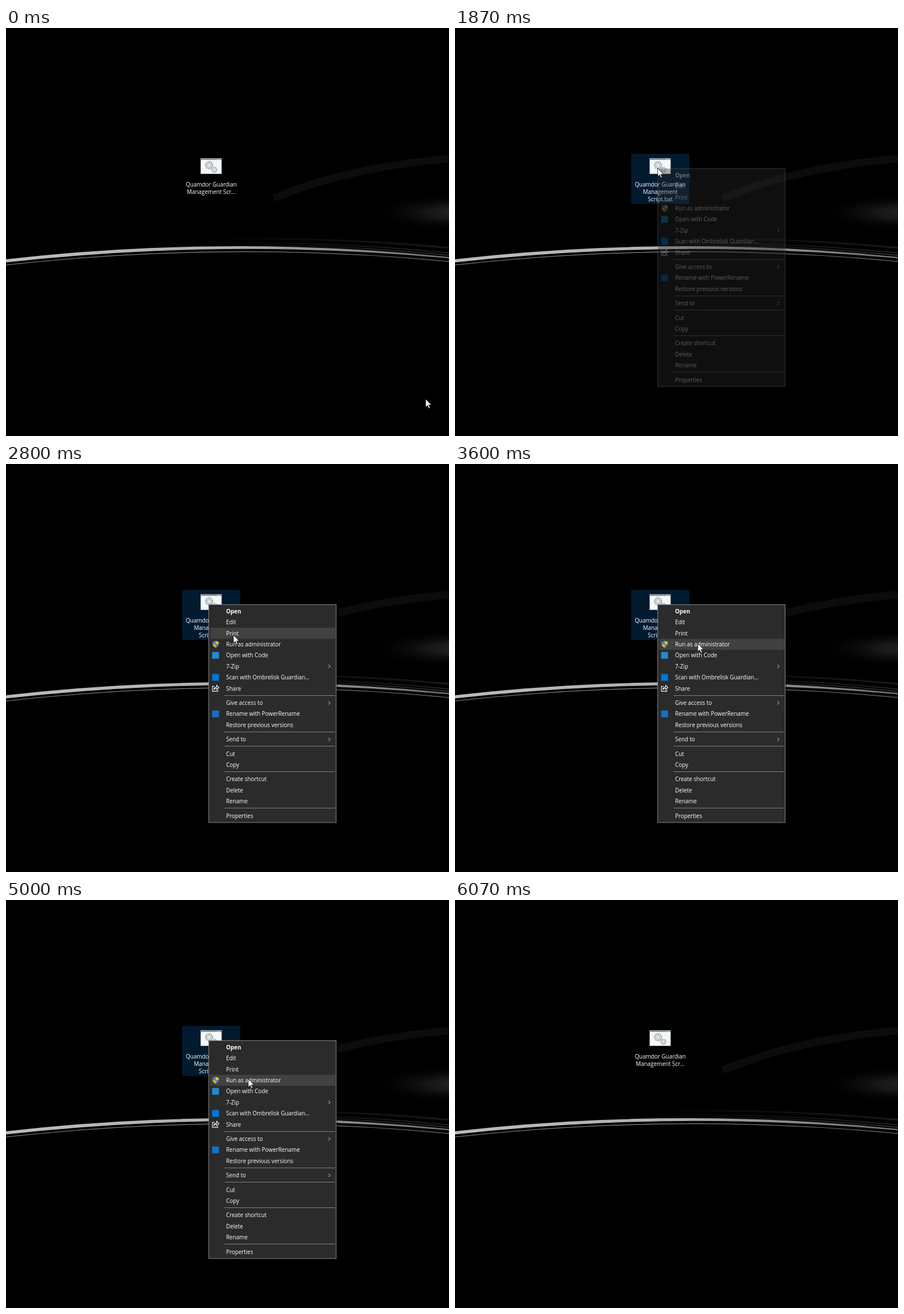
Recreate the animation shown at these times as an HTML page. Size 779 by 718 pixels, loop 6.27 s.

```html
<!DOCTYPE html>
<html lang="en">
<head>
<meta charset="utf-8">
<title>Context menu</title>
<style>
  html, body { margin: 0; height: 100%; overflow: hidden; background: #000; }
  svg { display: block; }
  text { font: 9.9px "Open Sans", "Noto Sans", sans-serif; fill: #fff; }
  .label { text-anchor: middle; }
  .bold { font-weight: 700; }
</style>
</head>
<body>
<svg width="779" height="718" viewBox="0 0 779 718">
  <defs>
    <radialGradient id="glow">
      <stop offset="0" stop-color="#242424"/>
      <stop offset=".35" stop-color="#171717"/>
      <stop offset="1" stop-color="#000" stop-opacity="0"/>
    </radialGradient>
    <linearGradient id="ring">
      <stop offset="0" stop-color="#bcbcbc"/>
      <stop offset=".5" stop-color="#b0b0b0"/>
      <stop offset=".75" stop-color="#8c8c8c"/>
      <stop offset="1" stop-color="#707070"/>
    </linearGradient>
    <linearGradient id="thin">
      <stop offset="0" stop-color="#606060"/>
      <stop offset=".4" stop-color="#858585"/>
      <stop offset="1" stop-color="#606060"/>
    </linearGradient>
    <linearGradient id="haze">
      <stop offset=".45" stop-color="#3c3c3c" stop-opacity="0"/>
      <stop offset="1" stop-color="#3c3c3c"/>
    </linearGradient>
    <filter id="soft" x="-10%" y="-50%" width="120%" height="200%"><feGaussianBlur stdDeviation=".5"/></filter>
    <filter id="blur" x="-20%" y="-50%" width="140%" height="200%"><feGaussianBlur stdDeviation="5"/></filter>
    <g id="gear">
      <circle r="6.2" fill="none" stroke="#98a1a6" stroke-width="2" stroke-dasharray="1.9 1.35"/>
      <circle r="5.2" fill="#dde2e5" stroke="#98a1a6" stroke-width=".8"/>
      <circle r="2.6" fill="#f6f8f9" stroke="#98a1a6" stroke-width=".8"/>
    </g>
  </defs>

  <rect width="779" height="718"/>
  <ellipse cx="800" cy="325" rx="165" ry="34" fill="url(#glow)"/>
  <g fill="none" filter="url(#blur)">
    <path d="M779 230Q600 245 470 300" stroke="#090909" stroke-width="14"/>
    <path d="M779 282Q480 300 460 320Q520 350 779 368" stroke="#060606" stroke-width="12"/>
  </g>
  <g fill="none" stroke="url(#haze)" filter="url(#soft)">
    <path d="M0 398Q390 350 779 387" stroke-width="3" opacity=".45"/>
    <path d="M0 405Q390 357 779 396" stroke-width="2" opacity=".6"/>
    <path d="M0 407Q390 361 779 400" stroke-width="1.5"/>
  </g>
  <g filter="url(#soft)">
    <path d="M0 407Q390 363 779 403V405.5Q390 369 0 412.5Z" fill="url(#ring)"/>
    <path d="M0 417Q390 373.5 779 411" fill="none" stroke="url(#thin)" stroke-width="1.3"/>
  </g>

  <rect id="pick" x="310" y="221.5" width="102"/>
  <rect x="342.5" y="229.5" width="36.5" height="27" fill="#f5f7f8" stroke="#b4b8ba" stroke-width=".8"/>
  <rect x="342.5" y="229.5" width="36.5" height="2.6" fill="#85898c"/>
  <path d="M371 230.8h6" stroke="#e2e4e5" stroke-dasharray="1.2 1"/>
  <use href="#gear" x="357" y="241.5"/>
  <use href="#gear" transform="translate(366.3 249.5) scale(.76)"/>
  <text class="label" x="361" y="278.5">Quamdor Guardian</text>
  <g id="short"><text class="label" x="361" y="291.8">Management Scr...</text></g>
  <g id="full">
    <text class="label" x="361" y="291.8">Management</text>
    <text class="label" x="361" y="305">Script.bat</text>
  </g>

  <g id="menu"></g>
  <path id="cursor" d="M0 0V14.2L3.3 11.2L5.5 16.6L7.7 15.7L5.5 10.4H10Z" fill="#fff" stroke="#000" stroke-width=".7"/>
</svg>

<script>
const $ = id => document.getElementById(id);
const FPS = 15, LOOP = 6270, PITCH = 19.4, GAP = 6;

const square = color => y => `<rect x="362.5" y="${y - 6}" width="12" height="12" fill="${color}"/>`;
const shield = y => `<g transform="translate(368.8 ${y})">
  <path d="M0-6.2Q-3-4.4-5.3-4.4V0H0Z" fill="#3a8bd0"/><path d="M0-6.2Q3-4.4 5.3-4.4V0H0Z" fill="#fbb829"/>
  <path d="M-5.3 0Q-4.6 4 0 6.3V0Z" fill="#fbb829"/><path d="M5.3 0Q4.6 4 0 6.3V0Z" fill="#3a8bd0"/></g>`;
const share = y => `<path transform="translate(368.5 ${y})" fill="none" stroke="#fff" stroke-width="1.1"
  d="M-2-3.5H-5.5V5H4V2.5M-3 2Q-2.5-2 2-2.3V-5.5L6-1.5L2 2V-.2Q-1.5-.2-3 2Z"/>`;
const arrow = y => `<path d="M567 ${y - 3}l3 3l-3 3" fill="none" stroke="#ddd"/>`;

// Each item: label, icon, has submenu. null is a separator.
const items = [
  ["Open"], ["Edit"], ["Print"],
  ["Run as administrator", shield],
  ["Open with Code", square("#2489ca")],
  ["7-Zip", null, true],
  ["Scan with Ombrelisk Guardian...", square("#0078d7")],
  ["Share", share], null,
  ["Give access to", null, true],
  ["Rename with PowerRename", square("#1670c4")],
  ["Restore previous versions"], null,
  ["Send to", null, true], null,
  ["Cut"], ["Copy"], null,
  ["Create shortcut"], ["Delete"], ["Rename"], null,
  ["Properties"]
];

const rows = [];
let y = 259.1, body = "";
for (const item of items) {
  if (!item) {
    body += `<path d="M384 ${Math.round(y - PITCH / 2 + GAP / 2) - .5}H578.5" stroke="#808080"/>`;
    y += GAP;
    continue;
  }
  const [label, icon, sub] = item;
  body += `<text x="387" y="${y + 3.6}"${rows.length ? "" : ' class="bold"'}>${label}</text>`;
  if (icon) body += icon(y);
  if (sub) body += arrow(y);
  rows.push(y - PITCH / 2);
  y += PITCH;
}
$("menu").innerHTML = `<rect x="359" y="250" width="224" height="382" opacity=".35"/>
  <rect x="356.5" y="247.5" width="224" height="383.5" fill="#2b2b2b" stroke="#858585"/>
  <rect id="hover" x="359" width="220" height="${PITCH}" fill="#414141"/>` + body;

// Pointer stops: tick, x, y
const stops = [
  [0, 738, 653], [12, 356.5, 247], [32, 356.5, 247], [37, 360, 249], [42, 400, 301],
  [52, 424.5, 316], [54, 427, 316], [59, 459, 317], [61, 459, 317], [66, 428, 313],
  [74, 428, 313], [75, 426, 315], [84, 91, 715], [85, 89, 722], [95, 89, 722]
];
const ease = u => u < .5 ? 4 * u ** 3 : 1 - 4 * (1 - u) ** 3;
const smooth = u => u * u * (3 - 2 * u);

function pointer(tick) {
  const i = stops.findIndex(s => s[0] > tick) - 1;
  const [t0, x0, y0] = stops[i], [t1, x1, y1] = stops[i + 1];
  const u = (i ? smooth : ease)((tick - t0) / (t1 - t0));
  return [x0 + (x1 - x0) * u, y0 + (y1 - y0) * u];
}

const show = (id, on) => $(id).style.display = on ? "" : "none";

function draw(now) {
  const tick = Math.floor((now % LOOP + 5) * FPS / 1000);
  const [px, py] = pointer(tick);
  const open = tick >= 28 && tick < 91;
  const over = px > 310 && px < 412 && py > 221 && py < 296;

  $("cursor").setAttribute("transform", `translate(${px} ${py})`);
  show("pick", open || over);
  $("pick").setAttribute("height", open ? 88 : 75);
  $("pick").setAttribute("fill", open ? "#021a30" : "#010f1a");
  show("short", !open);
  show("full", open);

  show("menu", open);
  $("menu").style.opacity = [.36, .76][tick - 28] ?? 1;
  const row = rows.find(top => py >= top && py < top + PITCH);
  show("hover", row !== undefined && px > 358 && px < 580);
  if (row !== undefined) $("hover").setAttribute("y", row);
  requestAnimationFrame(draw);
}
const start = performance.now();
(function loop() {
  requestAnimationFrame(function step() { draw(performance.now() - start); });
})();
</script>
</body>
</html>
```
